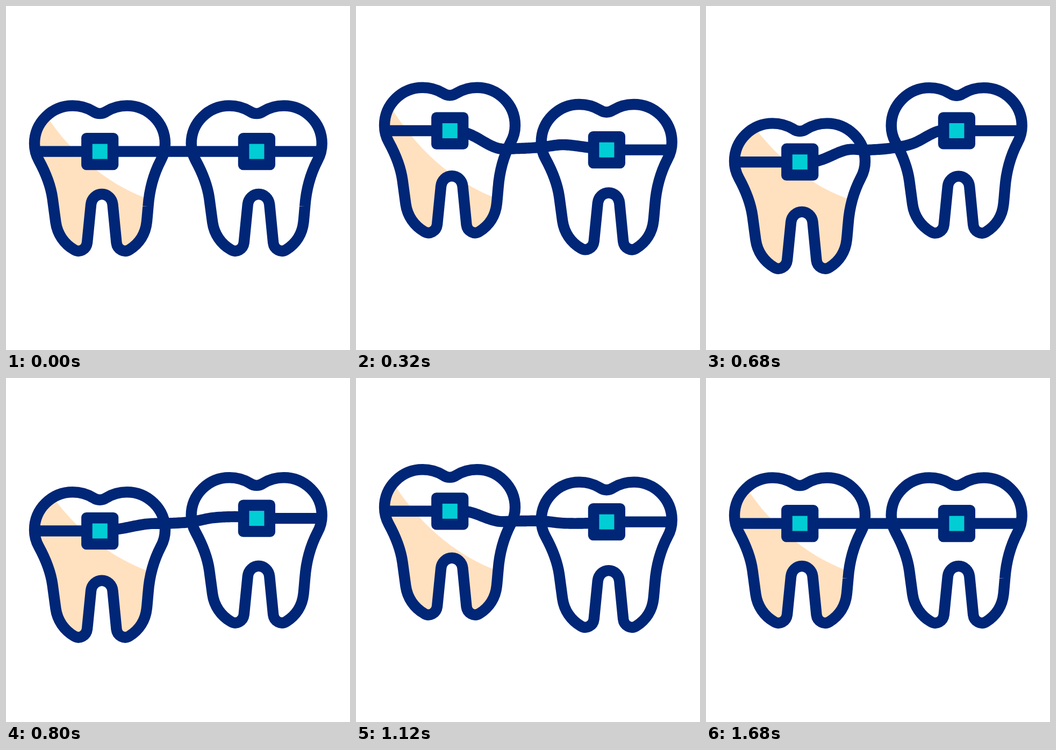
An HTML page with a canvas that plays this animation: 640 px wide and 640 px high, repeating every 2 s.

```html
<!DOCTYPE html>
<html lang="en">
<head>
<meta charset="utf-8">
<title>Braces</title>
<style>
  html, body { margin: 0; width: 100%; height: 100%; overflow: hidden; background: #fff; }
  canvas { display: block; width: 640px; height: 640px; }
</style>
</head>
<body>
<canvas id="stage" width="640" height="640"></canvas>
<script>
const ctx = document.getElementById('stage').getContext('2d');
const NAVY = '#002677', TEAL = '#00ced4', CREAM = '#ffe1bf';
const LOOP = 2000, STEP = 40, DELAY = 240, SPACING = 291.7;
const REST_Y = 270.6, BRACKET_X = 174.7;

const tooth = new Path2D(`M264.5 372.5 C263.5 383 262.8 393 261.8 402
  C259.5 424 248 442 229.5 453.5 C220 459.5 207 453 205.5 440.5
  L198.5 369 C197.3 358 188.5 350 178.3 350 S159.3 358 158.1 369
  L151 440.5 C149.5 453 136.5 459.5 127 453.5 C108 442.5 95.5 424 92.5 402.5
  L86.5 358 C83 333 73 309 61 287 C56 278 53 267 53 256
  C53 217 85 185.5 124 185.5 C138 185.5 151 189.3 162 196
  C170 201.5 179 201.5 187 196 C198 189.3 211 185.5 225 185.5
  C264 185.5 296 217 296 256 C296 267 293 278 288 287
  C275 312 267 338 264.5 372.5 Z`);

// The shade edge stays put while the tooth moves through it.
const shade = new Path2D('M60 180 C108 262 180 330 270 361 L320 380 V560 H20 V120 Z');

// Eased moves between extremes: end time and horizontal bezier handles.
const moves = [
  { end: 400, h1: .48, h2: .45 },
  { end: 720, h1: .4, h2: .6 },
  { end: 1040, h1: .33, h2: .65 },
  { end: 1440, h1: .33, h2: .4 }
];
const toothStops = [0, -35.7, 35.2, -17.7, 0];
const bracketStops = [0, -40.7, 21.7, -26.5, 0];

// Wire height away from rest at fixed x; the outer two follow their bracket.
const wireTimes = [0, 320, 560, 800, 1120, 1360, 1680];
const wire = [
  { x: 209, dy: [0, 5.5, 0, -3.5, 1, -3.5, 0] },
  { x: 262, dy: [0, -6.5, -7.5, 1, -4.5, -3.5, 0] },
  { x: 300, dy: [0, -5.5, -6, 0, -4.5, -.5, 0] },
  { x: 345, dy: [0, -8, -9.5, -3, -4.5, 1, 0] },
  { x: 385, dy: [0, -12.5, -17.5, -10.5, -.5, -4.5, 0] },
  { x: 432, dy: [0, -4.5, 4.5, -3, 2.5, 3, 0] }
];

function ease(u, h1, h2) {
  let lo = 0, hi = 1, s = u;
  for (let i = 0; i < 24; i++) {
    s = (lo + hi) / 2;
    const x = 3 * (1 - s) ** 2 * s * h1 + 3 * (1 - s) * s * s * h2 + s ** 3;
    if (x < u) lo = s; else hi = s;
  }
  return s * s * (3 - 2 * s);
}

function bounce(t, stops) {
  let start = 0;
  if (t <= 0) return 0;
  for (let i = 0; i < moves.length; i++) {
    const { end, h1, h2 } = moves[i];
    if (t < end) {
      const k = ease((t - start) / (end - start), h1, h2);
      return stops[i] + (stops[i + 1] - stops[i]) * k;
    }
    start = end;
  }
  return 0;
}

// Smooth curve through (xs, ys), level at both ends.
function spline(xs, ys, x) {
  const last = xs.length - 1;
  if (x >= xs[last]) return ys[last];
  let i = 0;
  while (x >= xs[i + 1]) i++;
  const slope = j => j === 0 || j === last ? 0
    : (ys[j + 1] - ys[j - 1]) / (xs[j + 1] - xs[j - 1]);
  const w = xs[i + 1] - xs[i], u = (x - xs[i]) / w, v = 1 - u;
  return ys[i] * v * v * (1 + 2 * u) + ys[i + 1] * u * u * (3 - 2 * u)
    + w * u * v * (slope(i) * v - slope(i + 1) * u);
}

function drawTooth(x, dy, shaded) {
  ctx.save();
  ctx.translate(x, dy);
  if (shaded) {
    ctx.save();
    ctx.clip(tooth);
    ctx.translate(-x, -dy);
    ctx.fillStyle = CREAM;
    ctx.fill(shade);
    ctx.restore();
  }
  ctx.stroke(tooth);
  // Hairline seam visible only at rest.
  if (Math.abs(dy) < .05) {
    ctx.fillStyle = 'rgba(255, 255, 255, .6)';
    ctx.beginPath();
    ctx.moveTo(253.5, 372);
    ctx.lineTo(264, 372.8);
    ctx.lineTo(253.5, 373);
    ctx.fill();
  }
  ctx.restore();
}

function drawBracket(x, y) {
  ctx.fillStyle = NAVY;
  ctx.beginPath();
  ctx.roundRect(x - 34.6, y - 34.6, 69.2, 69.2, 9.5);
  ctx.fill();
  ctx.fillStyle = TEAL;
  ctx.fillRect(x - 14, y - 14, 28, 28);
}

function drawWire(t, leftY, rightY) {
  const rightX = BRACKET_X + SPACING;
  const inner = wire.map(({ dy }, i) => spline(wireTimes, dy, t)
    + (i === 0 ? leftY : i === wire.length - 1 ? rightY : REST_Y));
  const xs = [BRACKET_X, ...wire.map(p => p.x), rightX];
  const ys = [leftY, ...inner, rightY];
  ctx.beginPath();
  ctx.moveTo(54, leftY);
  ctx.lineTo(BRACKET_X, leftY);
  for (let x = 178; x < rightX; x += 3) ctx.lineTo(x, spline(xs, ys, x));
  ctx.lineTo(rightX, rightY);
  ctx.lineTo(586, rightY);
  ctx.stroke();
}

function draw(t) {
  const late = t - DELAY;
  const leftY = REST_Y + bounce(t, bracketStops);
  const rightY = REST_Y + bounce(late, bracketStops);
  ctx.fillStyle = '#fff';
  ctx.fillRect(0, 0, 640, 640);
  ctx.strokeStyle = NAVY;
  ctx.lineWidth = 20.4;
  ctx.lineJoin = 'round';
  drawTooth(0, bounce(t, toothStops), true);
  drawTooth(SPACING, bounce(late, toothStops), false);
  drawWire(t, leftY, rightY);
  drawBracket(BRACKET_X, leftY);
  drawBracket(BRACKET_X + SPACING, rightY);
}

const began = performance.now();
function tick() {
  const t = (performance.now() - began) % LOOP;
  draw(Math.floor(t / STEP) * STEP);
  requestAnimationFrame(tick);
}
tick();
</script>
</body>
</html>
```
